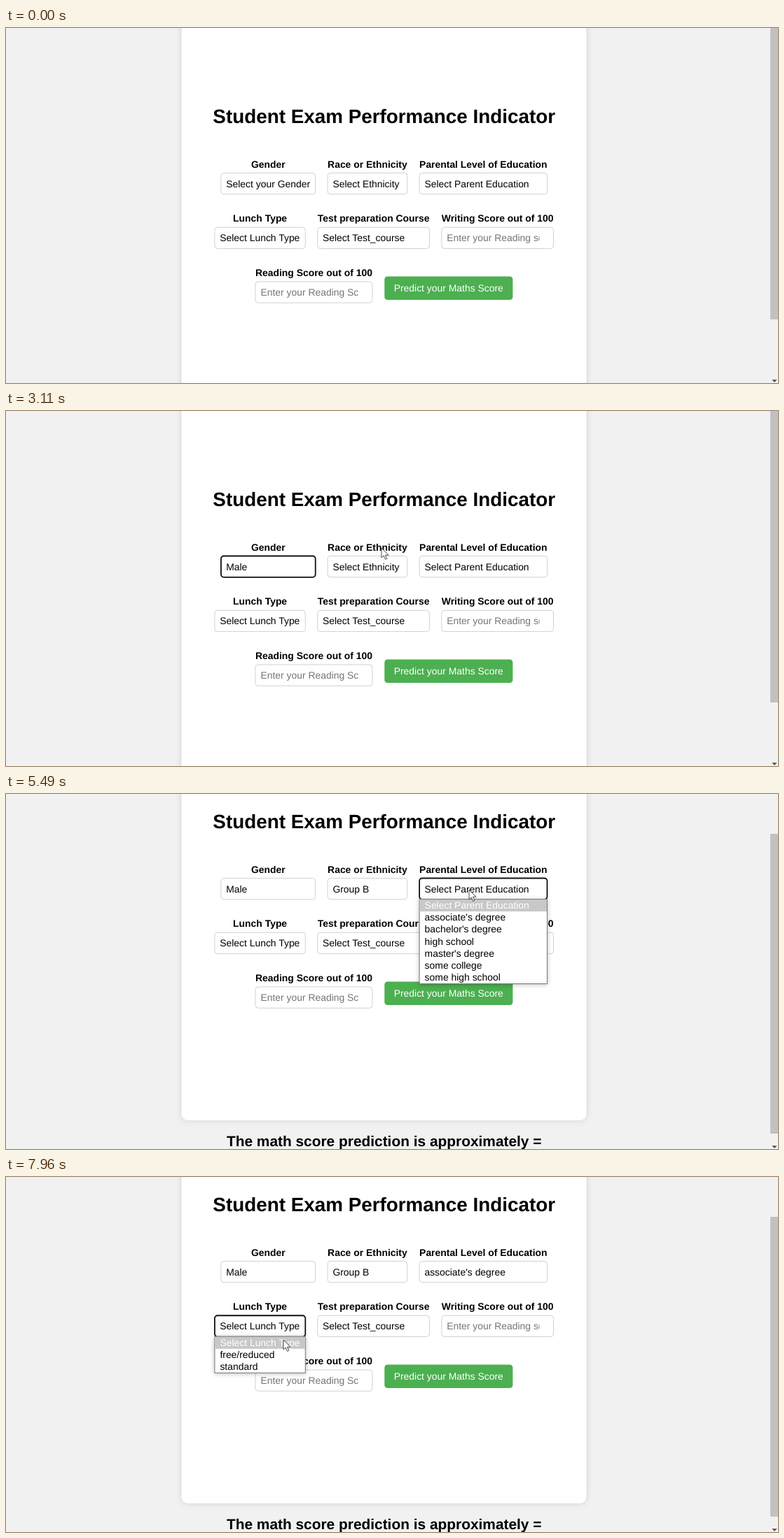
Recreate the animation shown at these times as an HTML page. Size 1102 by 508 pixels, loop 8 s.

```html
<!DOCTYPE html>
<html lang="en">
<head>
<meta charset="utf-8">
<title>Exam form</title>
<style>
  html, body { margin: 0; width: 100%; height: 100%; overflow: hidden; background: #f1f1f1; }
  svg { display: block; font: 13.92px "Liberation Sans", Arial, sans-serif; text-rendering: geometricPrecision; }
  .bold { font-weight: bold; text-anchor: middle; }
  .card { fill: #fff; filter: drop-shadow(0 0 4px rgba(0, 0, 0, .13)); }
  .box { fill: none; stroke: #ccc; stroke-width: .9; }
  .ring { fill: none; stroke: #101010; stroke-width: 1.8; }
  .hint { fill: #757575; }
  .list { fill: #fff; stroke: #767676; filter: drop-shadow(0 1px 3px rgba(0, 0, 0, .25)); }
  .ghost { fill: #fff; filter: drop-shadow(0 1px 2px rgba(0, 0, 0, .4)); }
</style>
</head>
<body>
<svg id="stage" width="1102" height="508"></svg>
<script>
const LOOP = 8000, CENTER = 539.7, GAP = 17.4;
const FIRST_ROW = 207.5, ROW_STEP = 77.75, BOX_HEIGHT = 30.3, OPTION = 17.25;
const SCROLL = 87, SCROLL_START = 3190, SCROLL_TIME = 290;
const FADE = 75; // an empty panel shows this long before its options

const rows = [
  [
    { label: "Gender", text: "Select your Gender", options: ["Male", "Female"],
      pick: "Male", open: 1690, close: 2760 },
    { label: "Race or Ethnicity", text: "Select Ethnicity", options: [..."ABCDE"].map(c => "Group " + c),
      pick: "Group B", open: 3860, close: 4750 },
    { label: "Parental Level of Education", text: "Select Parent Education",
      options: ["associate's degree", "bachelor's degree", "high school", "master's degree", "some college", "some high school"],
      pick: "associate's degree", open: 5090, close: 6820 }
  ],
  [
    { label: "Lunch Type", text: "Select Lunch Type", options: ["free/reduced", "standard"], open: 7560, close: LOOP },
    { label: "Test preparation Course", text: "Select Test_course" },
    { label: "Writing Score out of 100", hint: "Enter your Reading score" }
  ],
  [
    { label: "Reading Score out of 100", hint: "Enter your Reading Score" },
    { button: "Predict your Maths Score" }
  ]
];

// Pointer moves: start, end, x, y. It rests between them.
const moves = [
  [170, 170, 1031, 462], [170, 660, 640, 118], [660, 940, 475, 172], [1010, 1450, 379, 218],
  [1830, 2300, 382, 264], [2760, 3080, 536, 196], [3520, 3720, 534, 134], [4130, 4550, 531, 189],
  [4750, 5030, 661, 137], [5490, 6200, 685, 230], [6260, 6450, 686, 209], [6530, 6740, 684, 177],
  [6820, 7070, 586, 186], [7140, 7440, 400, 224], [7900, 7960, 396, 233]
];

const stage = document.getElementById("stage");
const ease = k => { k = Math.min(1, Math.max(0, k)); return k * k * (3 - 2 * k); };
const show = (el, on) => { el.style.display = on ? "" : "none"; };

function add(parent, tag, attrs, text) {
  const el = document.createElementNS("http://www.w3.org/2000/svg", tag);
  for (const key in attrs) el.setAttribute(key, attrs[key]);
  if (text) el.textContent = text;
  return parent.appendChild(el);
}
const rect = (parent, x, y, width, height, attrs) => add(parent, "rect", { x, y, width, height, ...attrs });
const write = (parent, x, y, text, attrs) => add(parent, "text", { x, y, ...attrs }, text);

const pen = document.createElement("canvas").getContext("2d");
function measure(text, weight = "") {
  pen.font = weight + ' 13.92px "Liberation Sans", Arial, sans-serif';
  return pen.measureText(text).width;
}

function widthOf(f) {
  if (f.button) return measure(f.button) + 27;
  return Math.max(measure(f.label, "bold"), f.text ? measure(f.text) + 15 : 0);
}

const page = add(stage, "g");
rect(page, 250.5, -60, 578, 614, { rx: 9, class: "card" });
const ghosts = add(page, "g");
write(page, CENTER, 135.7, "Student Exam Performance Indicator", { class: "bold", "font-size": 27.84 });
write(page, CENTER, 590.5, "The math score prediction is approximately =", { class: "bold", "font-size": 20.88 });

function drawField(f) {
  if (f.button) {
    rect(page, f.x, f.y - 7.5, f.w, 33.5, { rx: 4.3, fill: "#4caf50" });
    write(page, f.x + 13.4, f.y + 14.3, f.button, { fill: "#fff" });
    return;
  }
  write(page, f.x + f.w / 2, f.y - 8, f.label, { class: "bold" });
  f.box = rect(page, f.x, f.y, f.w, BOX_HEIGHT, { rx: 4, class: "box" });
  if (f.hint) {
    const clip = add(page, "svg", { x: f.x, y: f.y, width: f.w - 20, height: BOX_HEIGHT });
    write(clip, 7.4, 20.2, f.hint, { class: "hint" });
  } else {
    f.value = write(page, f.x + 7.3, f.y + 20.2, f.text);
  }
}

rows.forEach((row, r) => {
  row.forEach(f => { f.w = widthOf(f); });
  let x = CENTER - (row.reduce((sum, f) => sum + f.w, 0) + GAP * (row.length - 1)) / 2;
  for (const f of row) {
    f.x = x;
    f.y = FIRST_ROW + r * ROW_STEP;
    x += f.w + GAP;
    drawField(f);
  }
});

const menus = rows.flat().filter(f => f.options);
menus.forEach((f, n) => {
  const labels = [f.text, ...f.options], height = labels.length * OPTION;
  f.focus = f.open - FADE;
  f.blur = n + 1 < menus.length ? menus[n + 1].open - FADE : LOOP;
  f.top = f.y + BOX_HEIGHT;
  f.ghost = rect(ghosts, f.x, f.top, f.w, height + 1, { class: "ghost" });
  f.menu = add(page, "g");
  rect(f.menu, f.x, f.top, f.w, height, { class: "list" });
  f.mark = rect(f.menu, f.x + .5, f.top, f.w - 1, OPTION);
  f.lines = labels.map((label, i) => write(f.menu, f.x + 7.5, f.top + 13.1 + i * OPTION, label));
});

rect(stage, 1091, 0, 11, 508, { fill: "#f1f1f1" });
const thumb = rect(stage, 1091, 0, 11, 429, { fill: "#c1c1c1" });
add(stage, "path", { d: "M1093.3 503.2h7.4l-3.7 3.8z", fill: "#505050" });
const pointer = add(stage, "path", {
  d: "M0 0V14L3.2 11L5.6 16.3L7.8 15.3L5.5 10.2H10Z", fill: "#fff", stroke: "#222", "stroke-width": .8
});

function pointerAt(t) {
  let [, , x, y] = moves[0];
  for (const [start, end, toX, toY] of moves.slice(1)) {
    const k = ease((t - start) / (end - start));
    x += (toX - x) * k;
    y += (toY - y) * k;
  }
  return [x, y];
}

function draw(t) {
  const [x, y] = pointerAt(t);
  const scrolled = ease((t - SCROLL_START) / SCROLL_TIME);
  const scroll = SCROLL * scrolled;

  page.setAttribute("transform", `translate(0 ${-scroll})`);
  thumb.setAttribute("y", -12 + 69 * scrolled);
  pointer.setAttribute("transform", `translate(${x} ${y})`);
  show(pointer, t >= moves[0][0]);

  for (const f of menus) {
    const open = t >= f.open && t < f.close;
    f.box.setAttribute("class", t >= f.focus && t < f.blur ? "ring" : "box");
    f.value.textContent = t >= f.close ? f.pick : f.text;
    show(f.ghost, t >= f.focus && t < f.open);
    show(f.menu, open);
    if (!open) continue;
    const hit = Math.floor((y + scroll - f.top) / OPTION);
    const current = Math.min(f.options.length, Math.max(0, hit));
    f.mark.setAttribute("y", f.top + current * OPTION);
    f.mark.setAttribute("fill", current ? "#1e90ff" : "#c8c8c8");
    f.lines.forEach((el, i) => el.setAttribute("fill", i === current ? "#fff" : i ? "#000" : "#6d6d6d"));
  }
}

const begin = performance.now();
function tick() {
  draw((performance.now() - begin) % LOOP);
  requestAnimationFrame(tick);
}
tick();
</script>
</body>
</html>
```
